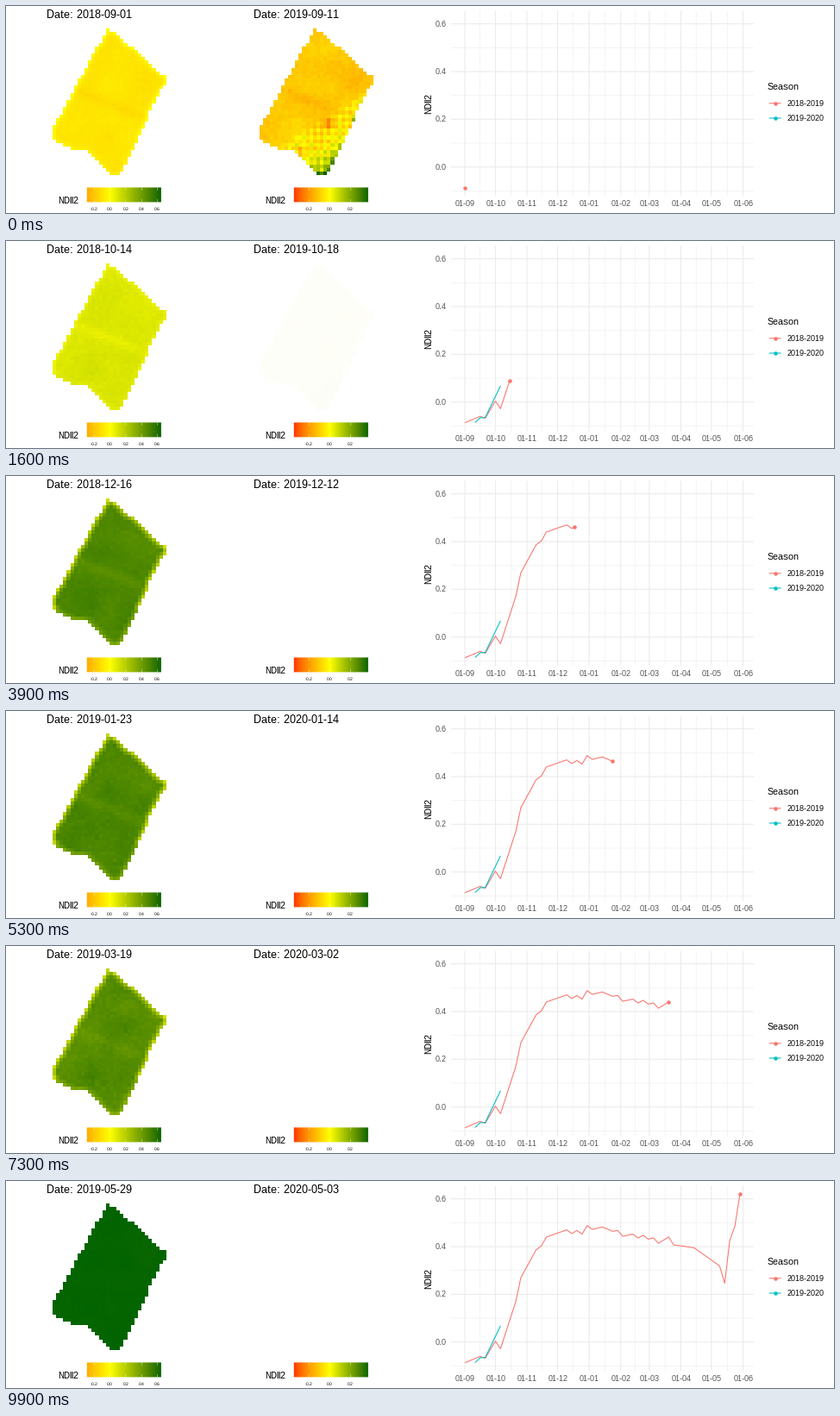
These frames come from a looping animation (960 px wide and 240 px high, 10000 ms). A matplotlib script:

```python
import numpy as np
import matplotlib.pyplot as plt
from matplotlib.animation import FuncAnimation
from matplotlib.path import Path

W, H, FRAMES = 960, 240, 100
LAST = FRAMES - 1
PT = 0.72  # points per pixel at 100 dpi
CORAL, TEAL = "#F8766D", "#00BFC4"

plt.rcParams.update({"font.family": "Liberation Sans", "text.hinting": "native",
                     "text.hinting_factor": 1})
fig = plt.figure(figsize=(W / 100, H / 100), dpi=100, facecolor="white")
ax = fig.add_axes([0, 0, 1, 1])
ax.axis("off")


def text(x, y, s, size, color="black", **kw):
    return ax.text(x, y, s, fontsize=size * PT, color=color, va="baseline", **kw)


def line(xs, ys, color, width=1.07, z=2):
    return ax.plot(xs, ys, color=color, lw=width * PT, zorder=z, snap=False,
                   solid_capstyle="butt", solid_joinstyle="round")[0]


def dot(x, y, color):
    return ax.plot(x, y, "o", ms=4.5 * PT, mew=0, color=color, zorder=4,
                   snap=False)[0]


def image(pixels, x0, x1, y0, y1):
    return ax.imshow(pixels, extent=(x0, x1, y1, y0), aspect="auto",
                     interpolation="nearest", zorder=2)


# ---- season means: days since 1 September -> NDII2 ----
TREND = {0: -.087, 15: -.06, 20: -.068, 30: .004, 35: -.028, 50: .17, 55: .27,
         70: .387, 75: .402, 80: .44, 100: .463, 115: .459, 120: .481,
         145: .471, 155: .45, 180: .438, 190: .421, 200: .44, 205: .407,
         225: .395, 250: .319, 255: .246, 260: .425, 265: .485, 270: .62}
RIPPLE = .007  # zigzag of the winter plateau
plateau = sorted(set(range(100, 191, 5)) - {130, 140, 160})
days_a = np.array(sorted({*TREND, *plateau}))
mean_a = np.interp(days_a, list(TREND), list(TREND.values()))
mean_a[np.isin(days_a, plateau)] += RIPPLE * (-1.0) ** np.arange(len(plateau))

days_b = np.array([10, 15, 20, 35])
mean_b = np.array([-.086, -.066, -.065, .068])
SPAN_A, SPAN_B = 270, 235


def to_frames(days, span):
    return np.rint(days * LAST / span)


# ---- diverging colour scale, blended in Lab ----
RED = np.array([53.24, 80.09, 67.20])
YELLOW = np.array([97.14, -21.55, 94.48])
GREEN = np.array([36.20, -43.37, 41.86])
XYZ_RGB = np.array([[3.2406, -1.5372, -0.4986],
                    [-0.9689, 1.8758, 0.0415],
                    [0.0557, -0.2040, 1.0570]])


def shade(v, top):
    t = np.clip(np.asarray(v) / top, -1, 1)[..., None]
    lab = YELLOW + np.where(t < 0, -t * (RED - YELLOW), t * (GREEN - YELLOW))
    fy = (lab[..., 0] + 16) / 116
    f = np.stack([fy + lab[..., 1] / 500, fy, fy - lab[..., 2] / 200], -1)
    xyz = np.where(f > 6 / 29, f ** 3, (f - 4 / 29) * 108 / 841)
    lin = np.clip(xyz * [0.9505, 1, 1.089] @ XYZ_RGB.T, 0, 1)
    return np.where(lin > 0.0031308, 1.055 * lin ** (1 / 2.4) - 0.055, 12.92 * lin)


# ---- field raster ----
ROWS, COLS = 41, 32
X0, X1, Y0, Y1 = 54, 186, 26, 196
col, row = np.meshgrid(np.arange(COLS), np.arange(ROWS))
px = X0 + (col + .5) * (X1 - X0) / COLS
py = Y0 + (row + .5) * (Y1 - Y0) / ROWS
OUTLINE = [(118, 25.6), (157, 56), (176, 78), (187, 79.5), (187, 91.5),
           (183, 92), (131, 197), (123.5, 197), (95, 167.5), (80, 166.5),
           (66, 162), (53, 150), (53, 138), (57, 137)]
inside = Path(OUTLINE).contains_points(
    np.c_[px.ravel(), py.ravel()]).reshape(px.shape)

pad = np.pad(inside, 1).astype(float)
around = sum(pad[r:r + ROWS, c:c + COLS] for r in range(3) for c in range(3)) - 1
edge = np.clip(1.45 * (1 - around / 8), 0, .8) * np.where(py > 155, .45, 1)
band = np.exp(-((py - .4 * px - 65) / 6) ** 2)
rng = np.random.default_rng(7)


def texture():
    coarse = rng.normal(size=(9, 7))
    cols, rows = np.linspace(0, 6, COLS), np.linspace(0, 8, ROWS)
    wide = np.array([np.interp(cols, np.arange(7), r) for r in coarse])
    full = np.array([np.interp(rows, np.arange(9), c) for c in wide.T]).T
    return full + .45 * rng.normal(size=full.shape)


base = texture()


def centred(v):
    return v - v[inside].mean()


def field_a(day, mean):
    fade = np.clip((270 - day) / 15, 0, 1)
    grain = (.6 * base + .6 * texture()) * np.interp(day, [0, 60, 255, 270],
                                                     [.013, .02, .024, .003])
    relief = edge * (.03 - mean) - .03 * band * (1 - edge)
    return mean + centred(grain + fade * relief) + .022 * (1 - fade)


def spot(x, y, spread):
    return np.exp(-((px - x) ** 2 + (py - y) ** 2) / spread)


def patchy():
    d = py - 152 + .64 * (px - 90)  # depth into the wet southern corner
    wet = np.clip(d / 12, 0, 1)
    stripes = ((-1.0) ** col + (-1.0) ** row) / 2
    v = -.13 + .018 * base - .02 * band
    v += wet * (.055 + .065 * stripes + .02 * texture())
    v += .012 * np.clip(d - 34, 0, None) * (.5 + 1.5 * edge)
    return (v - .2 * spot(135, 136, 50) - .13 * spot(101, 168, 40)
            + .28 * spot(163, 131, 10))


pattern = centred(patchy())
keys_a = to_frames(days_a, SPAN_A)
maps_a = np.array([field_a(d, m) for d, m in zip(days_a, mean_a)])
keys_b = to_frames(days_b - 10, SPAN_B)
maps_b = np.array([m + w * pattern + .006 * texture()
                   for m, w in zip(mean_b, (1, .8, .6, .12))])
GONE = to_frames(40, SPAN_B)  # first scene without data


def blend(keys, maps, f):
    i = min(np.searchsorted(keys, f, side="right"), len(keys) - 1)
    p = np.clip((f - keys[i - 1]) / (keys[i] - keys[i - 1]), 0, 1)
    return maps[i - 1] * (1 - p) + maps[i] * p


def raster(v, top, strength=1.0):
    rgb = 1 - strength * (1 - shade(v, top))
    return np.dstack([rgb, inside & (strength > 0)])


# ---- map panels with their colour bars ----
BAR_X, BAR_Y = (93.8, 179.9), (210.4, 227.4)


def cover(lo, hi):
    """Whole pixels touched by lo..hi and how much of each is covered."""
    p = np.arange(int(lo), int(np.ceil(hi)))
    return p, np.minimum(p + 1, hi) - np.maximum(p, lo)


def colour_bar(left, low, top):
    xs, ax_ = cover(*BAR_X)
    ys, ay = cover(*BAR_Y)
    t = (xs + .5 - BAR_X[0]) / (BAR_X[1] - BAR_X[0])
    rgb = np.tile(shade(low + t * (top - low), top), (len(ys), 1, 1))
    image(np.dstack([rgb, np.outer(ay, ax_)]),
          left + xs[0], left + xs[-1] + 1, ys[0], ys[-1] + 1)


def map_panel(left, low, top, ticks, zero, unit):
    title = text(left + 47, 14, "", 13.2)
    img = image(np.zeros((ROWS, COLS, 4)), left + X0, left + X1, Y0, Y1)
    colour_bar(left, low, top)
    text(left + 60, 229, "NDII2", 11)
    for t in ticks:
        x = zero + unit * t
        for y in (BAR_Y[0], BAR_Y[1] - 3.4):
            line([x, x], [y, y + 3.4], "white", .38, 3)
        text(x, 237, f"{t:.1f}", 5, ha="center")
    return title, img


TOP_A, TOP_B = .647, .371
title_a, img_a = map_panel(0, -.292, TOP_A, (-.2, 0, .2, .4, .6), 120.5, 92)
title_b, img_b = map_panel(240, -.349, TOP_B, (-.2, 0, .2), 375.5, 120)


# ---- chart ----
def cx(day):
    return 532 + 1.1813 * np.asarray(day)


def cy(v):
    return 186.7 - 276.7 * np.asarray(v)


GRID, GREY = "#EBEBEB", "#4D4D4D"
LEFT, RIGHT, TOP, BOTTOM = 516, 867, 5.5, 220.5
starts = np.arange("2018-09", "2019-07", dtype="datetime64[M]")
months = (starts.astype("datetime64[D]") - np.datetime64("2018-09-01")).astype(int)
for day in (months[1:] + months[:-1]) / 2:
    line([cx(day)] * 2, [TOP, BOTTOM], GRID, .53, 1)
for v in (-.1, .1, .3, .5):
    line([LEFT, RIGHT], [cy(v)] * 2, GRID, .53, 1)
for start, day in zip(starts, months):
    line([cx(day)] * 2, [TOP, BOTTOM], GRID, 1.07, 1)
    text(cx(day) + .3, 232, f"01-{str(start)[-2:]}", 8.8, GREY, ha="center")
for v in (0, .2, .4, .6):
    line([LEFT, RIGHT], [cy(v)] * 2, GRID, 1.07, 1)
    text(511, cy(v) + 3.1, f"{v:.1f}", 8.8, GREY, ha="right")
text(493.5, 113, "NDII2", 11, rotation=90, ha="center", rotation_mode="anchor")

text(883, 97, "Season", 11)
for y, color, label in ((112.8, CORAL, "2018-2019"), (130, TEAL, "2019-2020")):
    line([884.7, 898.6], [y, y], color)
    dot([891.6], [y], color)
    text(906, y + 3.2, label, 8.8)

line_a, dot_a = line([], [], CORAL), dot([], [], CORAL)
line_b, dot_b = line([], [], TEAL), dot([], [], TEAL)


def reveal(curve, head, days, vals, f):
    keys = to_frames(days, SPAN_A)
    if f < keys[0]:
        curve.set_data([], [])
        head.set_data([], [])
        return
    done = keys <= f
    x, y = cx(np.interp(f, keys, days)), cy(np.interp(f, keys, vals))
    curve.set_data(np.append(cx(days[done]), x), np.append(cy(vals[done]), y))
    head.set_data([x], [y])
    head.set_visible(f <= keys[-1])


def date(start, span, f):
    return f"Date: {np.datetime64(start) + f * span // LAST}"


def update(f):
    title_a.set_text(date("2018-09-01", SPAN_A, f))
    title_b.set_text(date("2019-09-11", SPAN_B, f))
    img_a.set_data(raster(blend(keys_a, maps_a, f), TOP_A))
    # colour and alpha fade together, hence the square
    left = np.clip((GONE - f) / (GONE - keys_b[-1]), 0, 1)
    img_b.set_data(raster(blend(keys_b, maps_b, f), TOP_B, left ** 2))
    reveal(line_a, dot_a, days_a, mean_a, f)
    reveal(line_b, dot_b, days_b, mean_b, f)
    return title_a, title_b, img_a, img_b, line_a, dot_a, line_b, dot_b


ax.set_xlim(0, W)
ax.set_ylim(H, 0)
anim = FuncAnimation(fig, update, frames=FRAMES, interval=100, repeat=True,
                     repeat_delay=0, blit=False)
plt.show()
```
